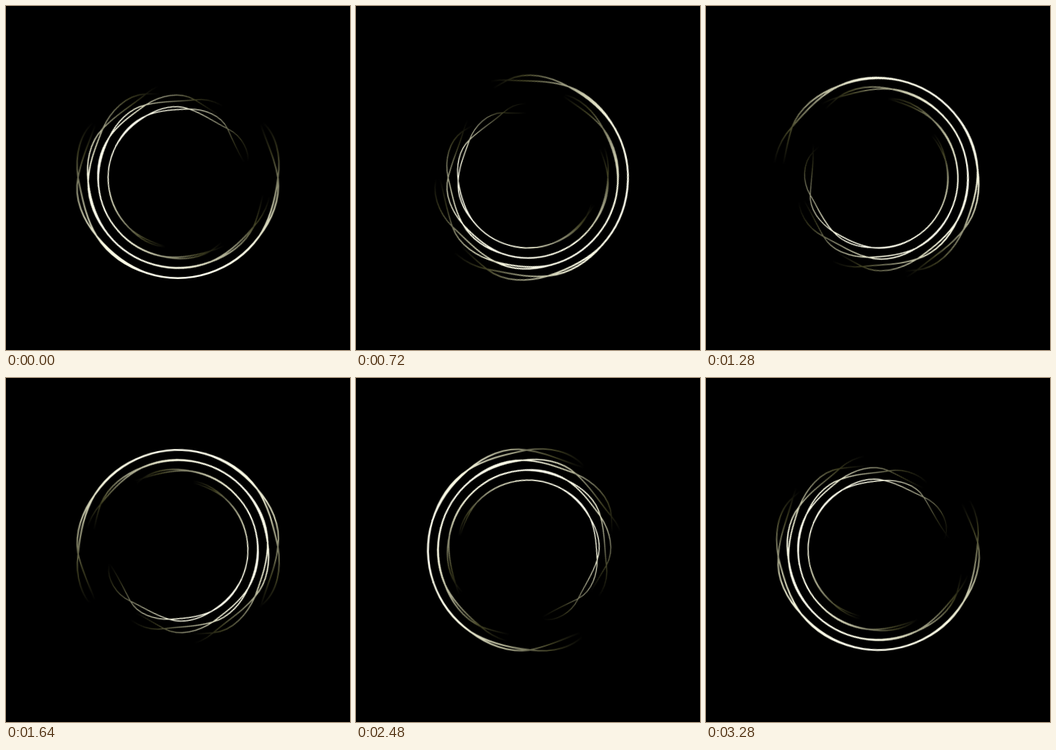
An HTML page without scripts for the animation above (3320 ms loop, 480 by 480 pixels).

```html
<!DOCTYPE html>
<html lang="en">
<head>
<meta charset="utf-8">
<title>Rippling rings</title>
<style>
  :root { --loop: 3320ms; }
  html, body { margin: 0; width: 100%; height: 100%; overflow: hidden; background: #000; }

  /* --i counts the rings from the outside in */
  .ring {
    position: absolute; left: 0; top: 0; width: 480px; height: 480px;
    overflow: hidden; background: #000; mix-blend-mode: screen;
  }
  .ring svg { position: absolute; left: 0; top: 0; width: 480px; height: 480px; }
  .place { transform: rotate(calc(33deg * var(--i))) scale(calc(1.395 - .14 * var(--i))); }

  /* the light turns one way, the ripples the other */
  .light {
    position: absolute; inset: 0; mix-blend-mode: multiply;
    background: conic-gradient(from calc(180deg + 44.5deg * var(--i)),
      #fffff0, #f9f9e2 48deg, #c9c9ac 68deg, #7e7e64 88deg, #404022 104deg, #000 123deg,
      #000 237deg, #404022 256deg, #7e7e64 272deg, #c9c9ac 292deg, #f9f9e2 312deg, #fffff0);
    animation: turn var(--loop) linear infinite reverse;
  }
  .wave { animation: turn var(--loop) linear infinite; }
  @keyframes turn { from { transform: rotate(0deg); } to { transform: rotate(360deg); } }

  /* ten equal pieces, each swelling a tenth of a cycle after the one before */
  path {
    --n: 0;
    fill: none; stroke: #fff; stroke-linejoin: round;
    transform: rotate(calc(216deg + 36deg * var(--n)));
    animation: swell calc(var(--loop) / 2) linear calc(var(--loop) / -20 * (var(--n) + .5)) infinite;
  }
  path:nth-child(2) { --n: 1; }
  path:nth-child(3) { --n: 2; }
  path:nth-child(4) { --n: 3; }
  path:nth-child(5) { --n: 4; }
  path:nth-child(6) { --n: 5; }
  path:nth-child(7) { --n: 6; }
  path:nth-child(8) { --n: 7; }
  path:nth-child(9) { --n: 8; }
  path:nth-child(10) { --n: 9; }

  /* flat, leaning forward, full, leaning back, flat */
  @keyframes swell {
    0%, 90%, 100% {
      d: path("M-30.9 -95.1C-10.8 -101.6 10.8 -101.6 30.9 -95.1C10.8 -101.6 -10.8 -101.6 -30.9 -95.1");
      stroke-width: 1.85px;
    }
    0% { animation-timing-function: cubic-bezier(.6, 0, 1, .9); }
    22.5% {
      d: path("M-30.9 -95.1C-11.5 -103.7 12.8 -107.8 30.9 -95.1C8.8 -95.4 -10.1 -99.5 -30.9 -95.1");
      stroke-width: 1.35px;
    }
    45% {
      d: path("M-30.9 -95.1C-14.4 -112.7 14.4 -112.7 30.9 -95.1C7.2 -90.5 -7.2 -90.5 -30.9 -95.1");
      stroke-width: 1px;
    }
    67.5% {
      d: path("M-30.9 -95.1C-12.8 -107.8 11.5 -103.7 30.9 -95.1C10.1 -99.5 -8.8 -95.4 -30.9 -95.1");
      stroke-width: 1.35px;
      animation-timing-function: cubic-bezier(0, .1, .4, 1);
    }
  }
</style>
</head>
<body>
<div class="ring" style="--i:0">
  <svg viewBox="-240 -240 480 480"><g class="place"><g class="wave">
    <path/><path/><path/><path/><path/><path/><path/><path/><path/><path/>
  </g></g></svg>
  <div class="light"></div>
</div>
<div class="ring" style="--i:1">
  <svg viewBox="-240 -240 480 480"><g class="place"><g class="wave">
    <path/><path/><path/><path/><path/><path/><path/><path/><path/><path/>
  </g></g></svg>
  <div class="light"></div>
</div>
<div class="ring" style="--i:2">
  <svg viewBox="-240 -240 480 480"><g class="place"><g class="wave">
    <path/><path/><path/><path/><path/><path/><path/><path/><path/><path/>
  </g></g></svg>
  <div class="light"></div>
</div>
<div class="ring" style="--i:3">
  <svg viewBox="-240 -240 480 480"><g class="place"><g class="wave">
    <path/><path/><path/><path/><path/><path/><path/><path/><path/><path/>
  </g></g></svg>
  <div class="light"></div>
</div>
</body>
</html>
```
